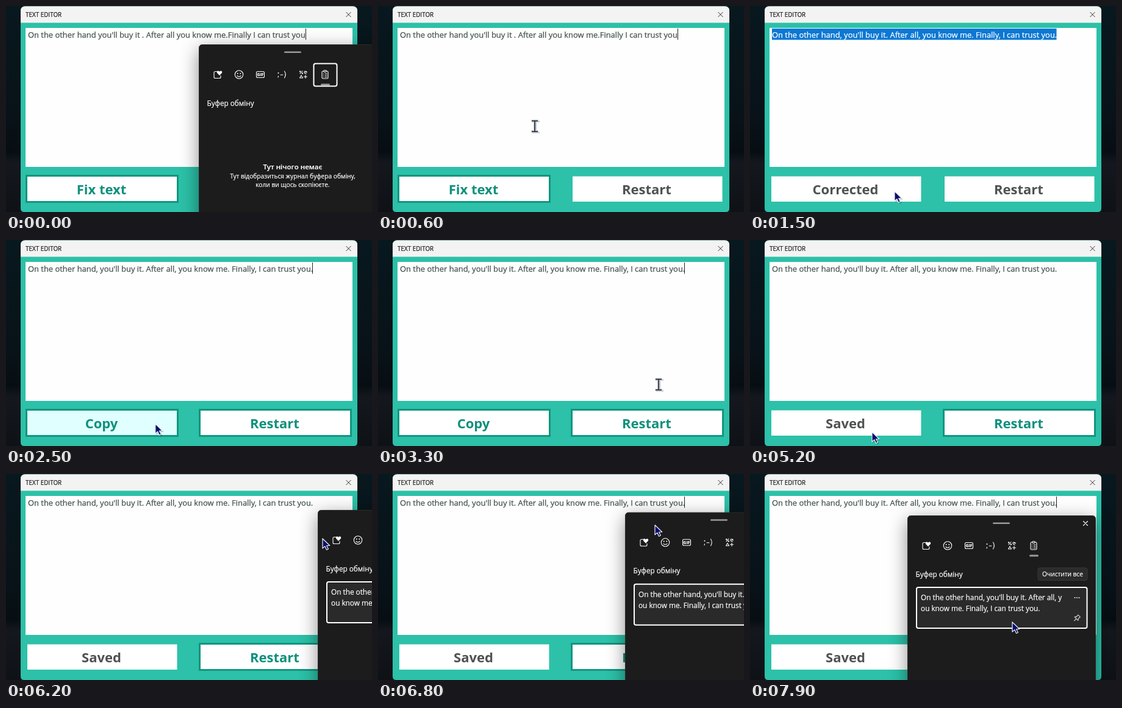
These frames come from a looping animation (600 px wide and 338 px high, 8000 ms). An HTML page:

```html
<!DOCTYPE html>
<html lang="en">
<head>
<meta charset="utf-8">
<title>Text editor</title>
<style>
  html, body { margin: 0; width: 100%; height: 100%; overflow: hidden; background: #0a1319; }
  svg { display: block; width: 600px; height: 338px; }
  text { font-family: "Open Sans", "Noto Sans", sans-serif; white-space: pre; }
  .body { font-size: 12.93px; fill: #42524f; stroke: #42524f; stroke-width: .25px; }
  .body.picked { fill: #fff; stroke: #fff; }
  .label { font-size: 22px; font-weight: 700; text-anchor: middle; }
  .panel text { fill: #fff; stroke: #fff; stroke-width: .2px; }
  .mid { text-anchor: middle; }
  .line { fill: none; stroke: #fff; stroke-width: 1.1; stroke-linecap: round; stroke-linejoin: round; }
  .panel { filter: drop-shadow(0 8px 15px rgba(0, 0, 0, .45)); }
</style>
</head>
<body>
<svg viewBox="0 0 600 338" xmlns="http://www.w3.org/2000/svg">
  <defs>
    <linearGradient id="night" x2="0" y2="1">
      <stop offset="0" stop-color="#07181e"/>
      <stop offset=".5" stop-color="#081319"/>
      <stop offset=".71" stop-color="#070e13"/>
      <stop offset=".76" stop-color="#14181e"/>
      <stop offset="1" stop-color="#0e1217"/>
    </linearGradient>
  </defs>

  <rect width="600" height="338" fill="url(#night)"/>

  <!-- editor window -->
  <path d="M24 8Q24 .5 31.500 .5H568.500Q576 .5 576 8V332Q576 338 570 338H30Q24 338 24 332Z" fill="#2cc1a8"/>
  <path d="M24 27.500V8Q24 .5 31.500 .5H568.500Q576 .5 576 8V27.500Z" fill="#f3f3f3"/>
  <text x="32" y="18" font-size="9.9" fill="#1c1c1c" stroke="#1c1c1c" stroke-width=".2">TEXT EDITOR</text>
  <path d="M557.500 10l8 8m0-8l-8 8" stroke="#333" stroke-width="1"/>
  <rect x="32" y="36" width="536" height="228" fill="#fefefe"/>
  <rect id="selection" x="36" y="37" width="466.500" height="18.500" fill="#0a78d4"/>
  <text id="copy" class="body" x="36" y="52"></text>
  <rect id="caret" y="37" width="1" height="18.500" fill="#222"/>
  <g id="left"><rect/><text class="label" x="156.500" y="309"></text></g>
  <g id="right"><rect/><text class="label" x="440.500" y="309">Restart</text></g>

  <!-- clipboard panel, drawn from its own top left corner -->
  <g id="panel" class="panel">
    <rect x=".5" y=".5" width="308" height="340" rx="5" fill="#1c1c1c" stroke="#2a2a2a"/>
    <rect x="140" y="11.500" width="28" height="2.500" rx="1.250" fill="#9a9a9a"/>
    <path class="line" d="M288.500 9.500l7 7m0-7l-7 7"/>
    <g transform="translate(31 49.500)">
      <path class="line" d="M-.5-5H-4Q-6-5-6-3V4Q-6 6-4 6H3Q5 6 5 4V2"/>
      <path fill="#fff" d="M3 1.500L-1-2.700Q-2-5 0-6Q2-6.500 3-4.800Q4-6.500 6-6Q8-5 7-2.700Z"/>
    </g>
    <g transform="translate(66 49.500)">
      <circle class="line" r="6.700"/>
      <circle cx="-2.300" cy="-1.700" r="1" fill="#fff"/>
      <circle cx="2.300" cy="-1.700" r="1" fill="#fff"/>
      <path class="line" d="M-3 2Q0 5 3 2"/>
    </g>
    <g transform="translate(101 49.500)">
      <rect class="line" x="-6.500" y="-5" width="13" height="10" rx="2"/>
      <text class="mid" y="2.600" font-size="7" font-weight="700">GIF</text>
    </g>
    <g class="line" transform="translate(136 49.500)">
      <path d="M-5.500 2.500L-6 4.500M-2 .5H2M4.500-5.500Q8 0 4.500 5.500"/>
      <circle cx="-5.500" cy="-2.500" r=".5"/>
    </g>
    <g class="line" transform="translate(171 49.500)">
      <path d="M-5-1.500L-1-6M5.500-5Q2-6.500 2-4T5.500-1.500M4-4H6.500M-5.500 5.500L-3 1.200L-.5 5.500ZM1.500 3.500H6.500M4 1V6"/>
      <circle cx="-4.800" cy="-5" r=".7"/><circle cx="-1.200" cy="-2" r=".7"/>
    </g>
    <g class="line" transform="translate(207 49.500)">
      <rect x="-5" y="-5.500" width="10" height="12" rx="1.500"/>
      <rect x="-2.200" y="-7" width="4.400" height="2.600" rx="1" fill="#1c1c1c"/>
      <path d="M-2.600-1.500h.2M0-1.500H3M-2.600 1.200h.2M0 1.200H3M-2.600 4h.2M0 4H3"/>
    </g>
    <rect x="200" y="64.500" width="15" height="3" rx="1.500" fill="#9a9a9a"/>
    <text x="13.500" y="100.500" font-size="11.7">Буфер обміну</text>
    <g id="empty">
      <rect x="188.500" y="31.500" width="38" height="37" rx="3" fill="none" stroke="#fff" stroke-width="2"/>
      <text class="mid" x="154" y="204.500" font-size="11.5" font-weight="600">Тут нічого немає</text>
      <text class="mid" x="154" y="219.500" font-size="10.2">Тут відобразиться журнал буфера обміну,</text>
      <text class="mid" x="154" y="233.500" font-size="10.2">коли ви щось скопіюєте.</text>
    </g>
    <g id="filled">
      <rect x="214" y="86" width="81" height="20.500" rx="3" fill="#2b2b2b" stroke="#383838"/>
      <text class="mid" x="254.500" y="100" font-size="10.2">Очистити все</text>
      <rect x="15" y="118" width="279.500" height="67" rx="3" fill="#2a2a2a" stroke="#fff" stroke-width="2"/>
      <text x="22" y="139" font-size="11.8">On the other hand, you'll buy it. After all, y</text>
      <text x="22" y="157" font-size="11.8">ou know me. Finally, I can trust you.</text>
      <g fill="#fff">
        <circle cx="274.500" cy="135" r=".9"/><circle cx="278" cy="135" r=".9"/><circle cx="281.500" cy="135" r=".9"/>
      </g>
      <path class="line" opacity=".8" transform="translate(278 168.500) rotate(45)" d="M-2.500-5H2.500L2-1Q4 0 4 1.500H-4Q-4 0-2-1ZM0 1.500V6"/>
    </g>
  </g>

  <!-- pointers -->
  <g id="arrow">
    <path d="M1.500 2V18L5.500 14.500L8.500 20.500L11.500 19L8.700 13.300H14Z" fill="#000" opacity=".25"/>
    <path d="M0 0V16L3.800 12.600L6.600 18.500L9.400 17.200L6.700 11.500H11.800Z" fill="#0a0f70" stroke="#e8ecf6" stroke-width="1.200" stroke-linejoin="round"/>
  </g>
  <g id="beam" fill="none">
    <path d="M-4 -7.500H8M2-7.500V10.500M-4 10.500H8" stroke="#000" stroke-width="2.500" opacity=".2"/>
    <path d="M-5.500-8.500H5.500M0-8.500V9M-5.500 9H5.500" stroke="#c4c8d0" stroke-width="4"/>
    <path d="M-5-8.500H5M0-8.500V9M-5 9H5" stroke="#18202c" stroke-width="1.500"/>
  </g>
</svg>
<script>
const LOOP = 8000;
const RAW = "On the other hand you'll buy it . After all you know me.Finally I can trust you";
const FIXED = "On the other hand, you'll buy it. After all, you know me. Finally, I can trust you.";
const FIX_AT = 1200, READY_AT = 2200, SAVE_AT = 4700, OPEN_AT = 5700;

// time, x, y
const pointerKeys = [
  [150, 625, 110], [600, 257, 197], [950, 237, 304], [2400, 237, 304],
  [3300, 460, 237], [3650, 450, 240], [4200, 200, 315], [5200, 200, 315],
  [6200, 519, 106], [6480, 560, 80], [7200, 307, 89], [7600, 430, 243]
];
const panelKeys = [
  [150, 316, 63], [350, 316, 385], [OPEN_AT - 1, 316, 385], [OPEN_AT, 511, 385],
  [OPEN_AT + 250, 511, 59], [6480, 511, 59], [7200, 258, 68]
];

const el = id => document.getElementById(id);
const show = (id, on) => el(id).setAttribute("display", on ? "inline" : "none");
const move = (id, p) => el(id).setAttribute("transform", `translate(${p[0]} ${p[1]})`);
const attrs = (node, values) => {
  for (const key in values) node.setAttribute(key, values[key]);
};

function along(keys, t) {
  const next = keys.findIndex(k => k[0] > t);
  if (next === 0) return keys[0].slice(1);
  if (next < 0) return keys[keys.length - 1].slice(1);
  const [t0, x0, y0] = keys[next - 1], [t1, x1, y1] = keys[next];
  const u = (t - t0) / (t1 - t0), s = u * u * (3 - 2 * u);
  return [x0 + (x1 - x0) * s, y0 + (y1 - y0) * s];
}

function button(id, x, enabled, hover, label) {
  const [box, text] = el(id).children;
  attrs(box, enabled
    ? { x: x + 1.5, y: 278.5, width: 248, height: 43, fill: hover ? "#e0ffff" : "#fff", stroke: "#12957f", "stroke-width": 3 }
    : { x: x + 3, y: 279.5, width: 245.5, height: 41.5, fill: "#fff", stroke: "none" });
  text.setAttribute("fill", enabled ? "#0f907c" : "#505252");
  text.textContent = label;
}

function leftLabel(t) {
  if (t < FIX_AT) return "Fix text";
  if (t < READY_AT) return "Corrected";
  return t < SAVE_AT ? "Copy" : "Saved";
}

function render(t) {
  const [px, py] = along(pointerKeys, t);
  const panel = along(panelKeys, t);
  const overPanel = px >= panel[0] && px < panel[0] + 309 && py >= panel[1];
  const inside = (x, y, w, h) => !overPanel && px >= x && px < x + w && py >= y && py < y + h;

  const fixed = t >= FIX_AT, selected = fixed && t < READY_AT;
  el("copy").textContent = fixed ? FIXED : RAW;
  el("copy").classList.toggle("picked", selected);
  show("selection", selected);
  el("caret").setAttribute("x", fixed ? 502 : 491);
  show("caret", !selected && (fixed ? t : t + 490) % 1060 < 530);

  const ready = t >= READY_AT;
  button("left", 32, !fixed || (ready && t < SAVE_AT), inside(32, 277, 251, 46), leftLabel(t));
  button("right", 316, ready, inside(316, 277, 251, 46), "Restart");

  show("panel", panel[1] < 380);
  move("panel", panel);
  show("empty", t < 1000);
  show("filled", t >= 1000);

  const beam = inside(32, 36, 536, 228);
  show("beam", beam);
  show("arrow", !beam);
  move("beam", [px, py]);
  move("arrow", [px, py]);
}

function tick() {
  render(performance.now() % LOOP);
  requestAnimationFrame(tick);
}
tick();
</script>
</body>
</html>
```
